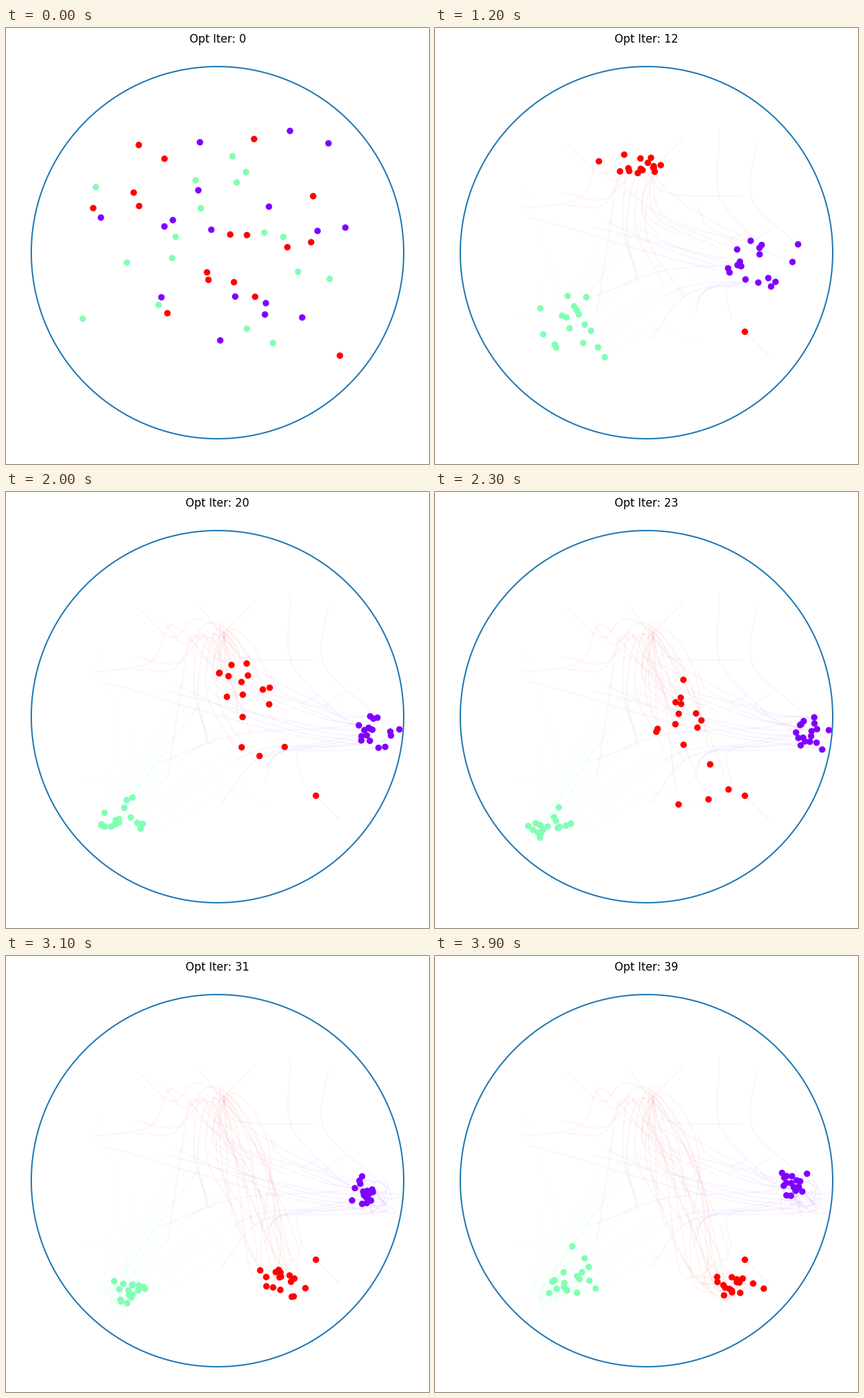
A matplotlib script that plays this animation: 636x656 px, repeating every 6.9 s.

```python
import numpy as np
import matplotlib.pyplot as plt
from matplotlib.animation import FuncAnimation

W, H, DPI = 636, 656, 100
LAST, FRAMES, INTERVAL = 39, 69, 100
CENTER, RADIUS = np.array([318, 338]), 280
VIOLET, GREEN, RED = "#8000ff", "#80ffb4", "#ff0000"

# each cluster: number of dots and, at every key step, center x, y and spread x, y
STEPS = np.array([0, 6, 12, 23, 27, 31, 39])
CLUSTERS = {
    VIOLET: (17, [(349, 315, 99, 95), (394, 334, 50, 46), (484, 357, 27, 20),
                  (564, 364, 15, 14), (558, 370, 13, 12), (537, 357, 8, 13),
                  (538, 344, 9, 12)]),
    GREEN: (17, [(311, 326, 103, 85), (264, 377, 56, 41), (212, 446, 29, 25),
                 (174, 504, 16, 13), (177, 519, 14, 12), (184, 505, 14, 8),
                 (206, 481, 20, 19)]),
    RED: (16, [(309, 301, 97, 78), (291, 272, 37, 31), (310, 209, 28, 10),
               (384, 372, 27, 46), (399, 432, 19, 30), (413, 487, 17, 18),
               (451, 497, 21, 9)]),
}

rng = np.random.default_rng(7)
time = np.arange(LAST + 1)[:, None]


def glide(keys):
    """Smooth curve through the key rows, one row per step."""
    slope = np.gradient(keys, STEPS, axis=0)
    k = np.searchsorted(STEPS[1:-1], time[:, 0], side="right")
    h = (STEPS[k + 1] - STEPS[k])[:, None]
    u = (time - STEPS[k][:, None]) / h
    return ((2*u**3 - 3*u**2 + 1) * keys[k]
            + (u**3 - 2*u**2 + u) * h * slope[k]
            + (3*u**2 - 2*u**3) * keys[k + 1]
            + (u**3 - u**2) * h * slope[k + 1])


def disc(n):
    """Random points in a disc, about unit spread along each axis."""
    r = 2 * np.sqrt((np.arange(n) + 0.5) / n)
    a = rng.uniform(0, 2 * np.pi, n)
    pts = rng.permutation(np.column_stack([r * np.cos(a), r * np.sin(a)]))
    pts -= pts.mean(axis=0)
    return pts / pts.std(axis=0)


def swarm(n, keys):
    """Dots that circle slowly, then faster, inside a moving cloud."""
    cloud = glide(np.array(keys, float))
    speed = rng.uniform(0.08, 0.22, n) * rng.choice([-1, 1], n)
    phase = (speed * time**2 / 40)[:, :, None]
    offset = np.cos(phase) * disc(n) + np.sin(phase) * disc(n)
    return cloud[:, None, :2] + cloud[:, None, 2:] * offset


tracks, colors = [], []
for color, (count, keys) in CLUSTERS.items():
    tracks.append(swarm(count, keys))
    colors += [color] * count

# the stray red dot drifts in and then stays put
ease = np.clip(1 - time / 7, 0, 1) ** 1.5
tracks.append((np.array([466, 457]) + 36 * ease)[:, None])
colors.append(RED)
pos = np.concatenate(tracks, axis=1)

# keep every dot inside the circle
away = pos - CENTER
dist = np.linalg.norm(away, axis=2, keepdims=True)
pos = CENTER + away * np.minimum(1, (RADIUS - 5) / dist)

fig = plt.figure(figsize=(W / DPI, H / DPI), dpi=DPI, facecolor="white")
ax = fig.add_axes([10 / W, 10 / H, 616 / W, 616 / H])
ax.set_xlim(10, 626)
ax.set_ylim(646, 30)
ax.axis("off")
title = ax.set_title("Opt Iter: 0", fontsize=12)

a = np.linspace(0, 2 * np.pi, 400)
ax.plot(CENTER[0] + RADIUS * np.cos(a), CENTER[1] + RADIUS * np.sin(a),
        color="#1f77b4", lw=1.5)
dots = ax.scatter(pos[0, :, 0], pos[0, :, 1], s=36, c=colors)
trails = [ax.plot([], [], color=c, alpha=0.045, lw=1.5)[0] for c in colors]


def draw(n):
    step = min(n, LAST)
    title.set_text(f"Opt Iter: {step}")
    dots.set_offsets(pos[step])
    for i, line in enumerate(trails):
        line.set_data(pos[:step, i, 0], pos[:step, i, 1])
    return [title, dots, *trails]


anim = FuncAnimation(fig, draw, frames=FRAMES, interval=INTERVAL,
                     repeat=True, repeat_delay=0, blit=False)
plt.show()
```
